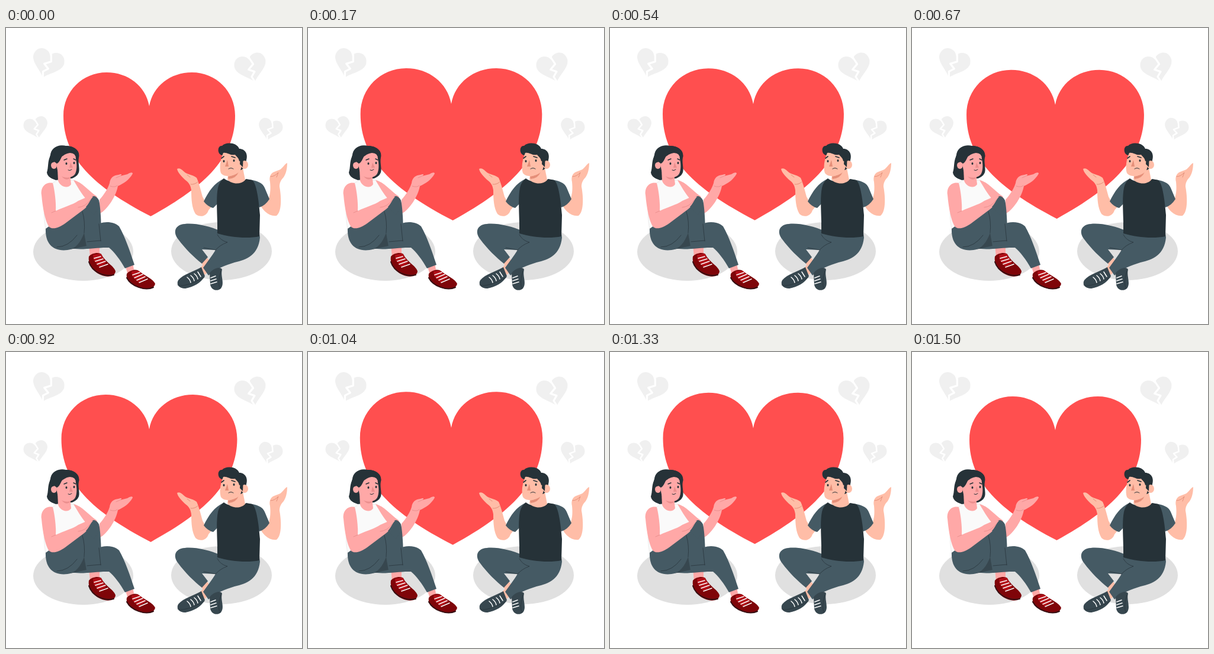
Recreate the animation shown at these times as an HTML page. Size 500 px wide and 500 px high, loop 1.54 s.

```html
<!DOCTYPE html>
<html lang="en">
<head>
<meta charset="utf-8">
<title>Beating heart</title>
<style>
  html, body { margin: 0; width: 100%; height: 100%; overflow: hidden; background: #fff; }
  svg { display: block; width: 100%; height: 100%; }
  .line { fill: none; stroke-linecap: round; stroke-linejoin: round; }
  .dark { fill: #263238; }
  .cloth { fill: #455a64; }
  .fold { stroke: #263238; stroke-width: .7; }
  .rose { fill: #ffa8a7; }
  .peach { fill: #ffbda7; }
  .lace { stroke: #fff; stroke-width: 1.5; }
</style>
</head>
<body>
<svg viewBox="0 0 500 500">
  <defs>
    <g id="broken">
      <path fill="#f0f0f0" d="M0-14C-4-25-25-27-27-8C-27 6-9 13 0 25C9 13 27 6 27-8C25-27 4-25 0-14Z"/>
      <path class="line" stroke="#fff" stroke-width="3.2" d="M1-17L5-5L-5 2L4 8L-3 15L1 28"/>
    </g>
  </defs>

  <use href="#broken" transform="translate(70 60) rotate(18)"/>
  <use href="#broken" transform="translate(414 67) rotate(-15)"/>
  <use href="#broken" transform="translate(51 168) rotate(-13) scale(.76)"/>
  <use href="#broken" transform="translate(446 171) rotate(14) scale(.76)"/>

  <path id="heart" fill="#ff4f4f" d="M242 132C236 98 206 75 170 75C129 75 97 107 97 148C97 220 148 268 244.500 318C340 266 387 216 387 148C387 107 355 75 314 75C278 75 248 98 242 132Z"/>

  <ellipse cx="130.500" cy="378" rx="84.500" ry="49" fill="#e0e0e0"/>
  <ellipse cx="364" cy="377" rx="85" ry="49" fill="#e0e0e0"/>

  <g id="woman">
    <path class="dark" d="M75 216C75 203 88 196 100 199C114 199 126 206 123 219C121 228 126 240 122 246C120 250 116 252 112 254L84 257C76 254 70 251 69 244C72 236 70 224 75 216Z"/>
    <path fill="#fafafa" stroke="#e0e0e0" stroke-width=".6" d="M78 262L90 256L116 257C130 265 142 284 142 304L100 344L68 346C65 330 63 312 65 300Z"/>
    <path class="rose" d="M87 238L88 258C92 269 105 272 110 264L108 246Z"/>
    <path fill="#eb8f8e" d="M93 249C98 257 104 257 109 253L105 249Z"/>
    <path class="rose" d="M114 257C129 260 140 276 153 284L158 298L142 296C130 285 122 270 114 257Z"/>
    <path class="rose" d="M158 314C172 306 186 284 189 267C198 263 208 257 214 246C214 243 209 244 205 247L193 250C197 247 195 246 190 248C181 249 176 253 175 262C172 272 165 282 158 290Z"/>
    <path class="line" stroke="#eb8f8e" d="M176 267Q184 270 188 266M193 250L186 253"/>
    <path class="rose" d="M85 221C95 219 98 212 108 211Q118 211 118 221C120 230 120 240 117 246C113 253 101 255 93 250C87 246 85 234 85 221Z"/>
    <ellipse class="rose" cx="81" cy="232" rx="5" ry="6"/>
    <path class="dark" d="M74 229C71 208 86 197 101 199C116 199 125 208 123 219C119 211 110 209 103 211C92 213 94 225 86 229L82 226Z"/>
    <ellipse class="dark" cx="102" cy="229" rx="1.500" ry="2"/>
    <ellipse class="dark" cx="115" cy="228" rx="1.500" ry="2"/>
    <path class="line" stroke="#263238" stroke-width="1.500" d="M98 223L103 221M114 221L118 223"/>
    <path fill="#eb8f8e" d="M109 227L113 236L107 236Z"/>
    <path class="line" stroke="#263238" d="M105 240Q108 242 111 239"/>

    <path class="rose" d="M140 365L158 362L158 384L142 388ZM201 400L214 397L217 413L206 417Z"/>
    <path class="cloth" d="M108 372L158 330C170 326 184 328 191 335C201 352 209 376 217 400L201 406C193 392 183 378 174 371C155 370 130 376 108 372Z"/>
    <path fill="#37474f" d="M104 375C122 370 132 350 133 330L136 368Z"/>
    <path class="cloth" d="M67 339C66 365 80 378 104 375C118 373 126 362 132 346L136 369L160 367C162 340 160 304 157 291C153 283 146 282 139 288L106 312Z"/>
    <path class="line fold" d="M132 346Q134 326 129 310M120 350Q105 370 86 370M157 331L160 360M137 361L160 359"/>
    <path class="rose" d="M79 262C66 259 58 270 60 282C62 305 66 325 72 335C78 342 90 337 100 330L132 306C138 301 145 295 148 289C150 285 143 282 138 285L122 292C112 299 98 302 84 309C85 295 82 273 79 262Z"/>
    <path class="cloth" d="M135 302C141 296 143 288 148 284C154 284 158 292 158 302L148 316Z"/>
    <path class="line" stroke="#eb8f8e" d="M84 309L77 312M122 303Q134 302 142 291"/>

    <path fill="#7f0509" d="M140 386C144 380 157 378 161 382C168 396 183 402 185 411C184 420 172 422 160 417C146 411 138 398 140 386Z"/>
    <path fill="#b20f18" d="M147 383L160 381L169 397L158 404L148 392Z"/>
    <path class="line" stroke="#371013" stroke-width="2" d="M140 395C145 412 166 421 182 417"/>
    <path class="line lace" d="M149 389L160 386M151 394L164 390M154 399L168 394M158 404L172 399"/>
    <path fill="#7f0509" d="M204 415C209 409 221 406 225 411C235 419 249 424 252 432C250 442 235 443 223 438C211 433 202 426 204 415Z"/>
    <path fill="#b20f18" d="M212 411L224 410L237 421L224 430L213 419Z"/>
    <path class="line" stroke="#371013" stroke-width="2" d="M204 422C211 436 235 445 249 438"/>
    <path class="line lace" d="M214 417L226 413M217 422L231 416M221 426L235 420M225 430L239 424"/>
  </g>

  <g id="man">
    <path class="peach" d="M337 294L332 285C328 270 326 262 322 253C314 247 306 248 300 242C296 238 292 236 289 238C290 244 296 250 302 256C309 261 312 266 313 274C313 290 314 304 320 314C328 321 339 318 342 308L350 298Z"/>
    <path class="line" stroke="#e58f79" d="M306 248L311 252M312 264Q318 265 324 260"/>
    <path class="peach" d="M443 290C447 280 447 270 446 260C444 252 447 245 453 243L461 240C466 239 470 230 475 228C475 237 473 246 469 252C464 257 462 262 462 268C466 290 465 311 457 317C444 319 434 308 429 298Z"/>
    <path class="line" stroke="#e58f79" d="M447 251Q454 251 460 244L457 252"/>
    <path class="cloth" d="M367 255C352 262 342 276 334 293Q341 302 350 304L360 294ZM408 256C424 257 434 262 437 270L445 289Q438 300 428 303L418 285Z"/>
    <path class="peach" d="M330 397L340 388L355 411L344 417ZM328 405L339 394L349 403L336 417Z"/>
    <path class="cloth" d="M364 344C340 332 310 328 296 332C284 336 283 347 291 357C302 372 318 388 331 398L341 387L331 374L354 375C348 385 340 395 333 405L342 418C354 407 370 401 386 396C408 391 426 383 429 354L427 340Z"/>
    <path class="line fold" d="M354 375Q362 366 374 362Q362 359 357 349M354 375L334 371"/>
    <path class="dark" d="M368 254C378 262 396 262 406 255L416 257C423 262 427 290 429 316L428 352C408 356 380 354 357 347C358 323 354 290 358 270C360 262 363 258 368 254Z"/>
    <path class="peach" d="M376 243L400 236L404 257C396 265 381 264 374 256Z"/>
    <path fill="#e58f79" d="M375 251Q386 249 393 243Q389 254 376 255Z"/>
    <path class="dark" d="M365 215C356 213 357 198 365 199C371 192 390 193 394 204C404 204 409 213 406 223L405 234L397 240Z"/>
    <path class="peach" d="M367 211C362 222 360 236 363 245C368 252 380 251 388 247C397 243 399 235 398 224L394 225C393 219 390 218 387 214C379 216 373 209 367 211Z"/>
    <ellipse class="peach" cx="403" cy="231" rx="6" ry="7"/>
    <path class="dark" d="M396 214L401 214L400 235L395 230Z"/>
    <ellipse class="dark" cx="368" cy="225" rx="1.500" ry="2"/>
    <ellipse class="dark" cx="385" cy="224" rx="1.500" ry="2"/>
    <path class="line" stroke="#263238" stroke-width="1.700" d="M364 220L368 217M381 217L387 219"/>
    <path fill="#e58f79" d="M374 223L370 234L376 234Z"/>
    <path class="line" stroke="#263238" d="M376 238Q380 235 384 238"/>

    <path fill="#37474f" d="M330 404C318 411 299 416 291 426C287 433 292 440 303 440C317 437 329 431 336 419Z"/>
    <path class="line fold" d="M290 434Q302 439 335 421"/>
    <path class="line lace" d="M306 421Q311 425 312 430M312 418Q317 422 318 427M318 415Q323 419 324 424M324 412L329 420"/>
    <path fill="#37474f" d="M344 414C350 406 362 402 365 408C362 420 370 431 363 440C356 446 346 442 345 433Z"/>
    <path class="line fold" d="M363 410Q357 428 361 440"/>
    <path class="line lace" d="M346 422L354 419M346 427L355 424M346 432L356 429"/>
  </g>
</svg>
<script>
  const LOOP = 1540, BEAT = 1500, STEP = 1000 / 24;
  const heart = document.getElementById('heart');
  // Time in ms and growth of the heart, joined linearly
  const beats = [[0, 0], [310, .107], [375, .083], [667, .034], [845, .006], [917, .024], [1167, .103], [BEAT, 0]];

  function growth(time) {
    const next = Math.max(1, beats.findIndex(([at]) => at >= time));
    const [t0, g0] = beats[next - 1], [t1, g1] = beats[next];
    return g0 + (g1 - g0) * (time - t0) / (t1 - t0);
  }

  function draw() {
    const step = Math.floor((performance.now() % LOOP) / STEP + .1);
    const scale = 1 + growth(Math.min(step * STEP, BEAT));
    heart.setAttribute('transform', `translate(242 196.5) scale(${scale}) translate(-242 -196.5)`);
    requestAnimationFrame(draw);
  }
  draw();
</script>
</body>
</html>
```
